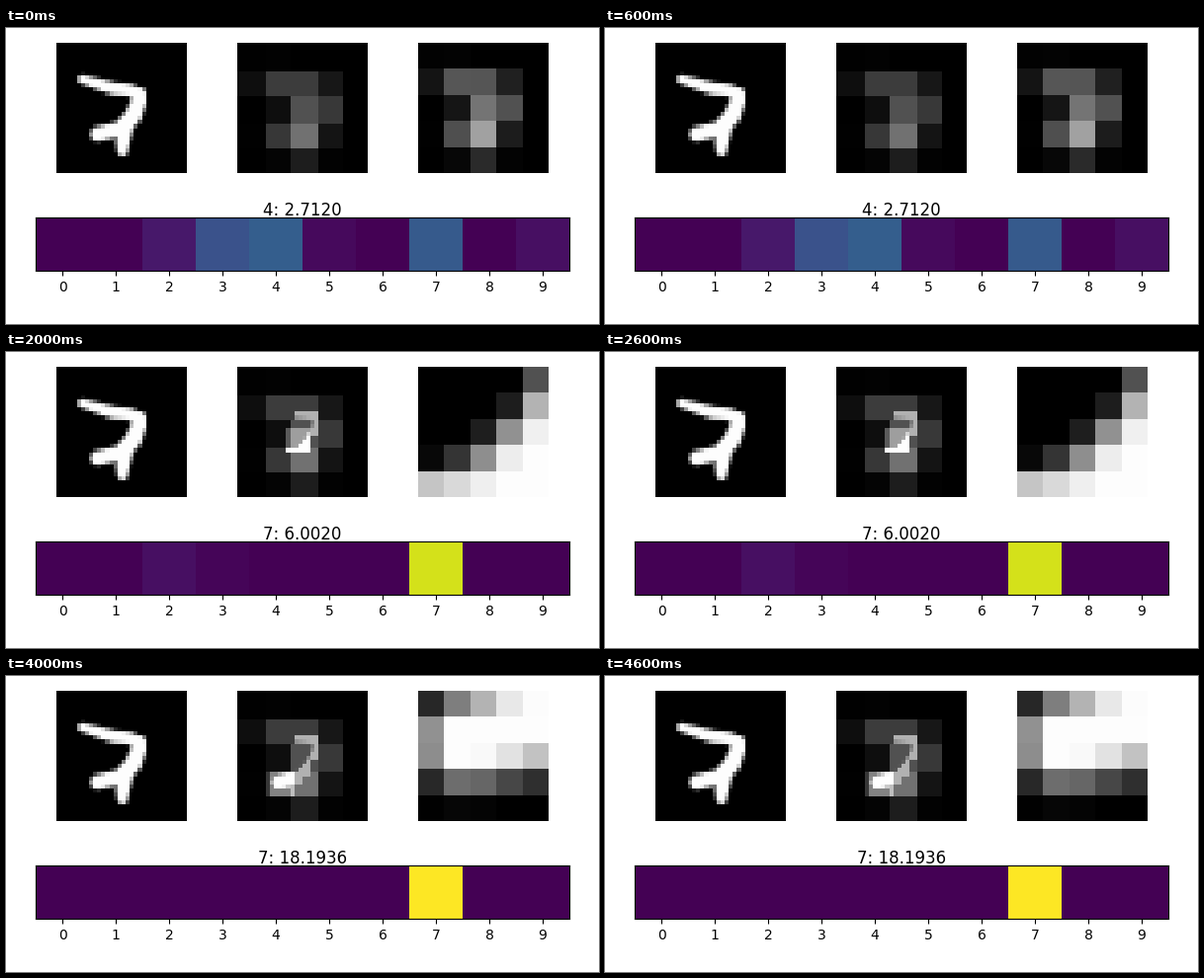
Animation of 600x300 px, one loop 5 s. Source, as a matplotlib script:

```python
import matplotlib.pyplot as plt
import numpy as np
from matplotlib.animation import FuncAnimation
from matplotlib.gridspec import GridSpec

N = 32       # canvas cells per side
SIZE = 6     # canvas cells per side of a glimpse
COARSE = 5   # cells per side of what the reader sees

# Pen strokes of the digit: (x, y, radius) in canvas cells
STROKES = [
    [(6.3, 9, 1.1), (10, 10.1, 1.35), (14, 11.3, 1.5), (18, 11.6, 1.4),
     (20.2, 12.8, 1.8), (20.2, 14.5, 1.8), (18.8, 18, 2.1), (16, 21.2, 2),
     (13.2, 21.7, 1.8), (10.2, 22.4, 1.8)],
    [(17, 20, 2.1), (16.3, 24, 1.8), (16.2, 26.5, 1.4)],
]

# Glimpse corner (col, row), class probabilities and score at each step
STEPS = [
    (None, {2: .064, 3: .25, 4: .30, 5: .025, 7: .285, 9: .04}, "4: 2.7120"),
    ((14, 11), {4: .07, 7: .92}, "7: 6.4849"),
    ((12, 15), {2: .042, 3: .015, 7: .935}, "7: 6.0020"),
    ((10, 17), {2: .035, 7: .963}, "7: 9.3018"),
    ((8, 20), {7: 1}, "7: 18.1936"),
]


def draw_digit():
    y, x = np.mgrid[:N, :N] + 0.5
    ink = np.full((N, N), -9.0)
    for stroke in STROKES:
        for (x0, y0, r0), (x1, y1, r1) in zip(stroke, stroke[1:]):
            dx, dy = x1 - x0, y1 - y0
            t = np.clip(((x - x0) * dx + (y - y0) * dy) / (dx**2 + dy**2), 0, 1)
            dist = np.hypot(x - x0 - t * dx, y - y0 - t * dy)
            ink = np.maximum(ink, r0 + t * (r1 - r0) - dist)
    return 253 * np.clip(ink + 0.5, 0, 1)


def shrink(img):
    """Antialiased bilinear resize of a square image to COARSE cells."""
    n = len(img)
    scale = n / COARSE
    centers = (np.arange(COARSE) + 0.5) * scale
    gap = np.abs(centers[:, None] - np.arange(n) - 0.5)
    weights = np.maximum(0, 1 - gap / scale)
    weights /= weights.sum(axis=1, keepdims=True)
    return weights @ img @ weights.T


def enlarge(img):
    idx = np.arange(N) * COARSE // N
    return img[np.ix_(idx, idx)]


def window(corner):
    col, row = corner
    return np.s_[row:row + SIZE, col:col + SIZE]


DIGIT = draw_digit()


def glimpse(step):
    corner = STEPS[step][0]
    return shrink(DIGIT[window(corner)] if corner else DIGIT)


def memory(step):
    """Everything seen so far, with the current glimpse highlighted."""
    seen = enlarge(shrink(DIGIT))
    for corner, *_ in STEPS[1:step + 1]:
        area = window(corner)
        seen[area] = np.maximum(seen[area], DIGIT[area])
    seen *= 0.7
    if step:
        seen[area] += 0.3 * 255
    return seen


def scores(step):
    probs = STEPS[step][1]
    return np.array([[probs.get(k, 0) for k in range(10)]])


fig = plt.figure(figsize=(6, 3), dpi=100, facecolor="white")
grid = GridSpec(2, 3, figure=fig, left=0.05, right=0.95, bottom=0.05,
                top=0.95, wspace=0.05, hspace=0.05)


def add_panel(col, data):
    ax = fig.add_subplot(grid[0, col])
    ax.axis("off")
    return ax.imshow(data, cmap="gray", vmin=0, vmax=255,
                     interpolation="nearest")


add_panel(0, DIGIT)
canvas = add_panel(1, memory(0))
view = add_panel(2, glimpse(0))

bar_ax = fig.add_subplot(grid[1, :])
bar = bar_ax.imshow(scores(0), cmap="viridis", vmin=0, vmax=1,
                    interpolation="nearest")
bar_ax.set_xticks(range(10))
bar_ax.set_yticks([])
title = bar_ax.set_title("", y=1, pad=1.5)


def update(step):
    canvas.set_data(memory(step))
    view.set_data(glimpse(step))
    bar.set_data(scores(step))
    title.set_text(STEPS[step][2])
    return canvas, view, bar, title


anim = FuncAnimation(fig, update, frames=len(STEPS), interval=1000,
                     repeat=True, repeat_delay=0)
plt.show()
```
